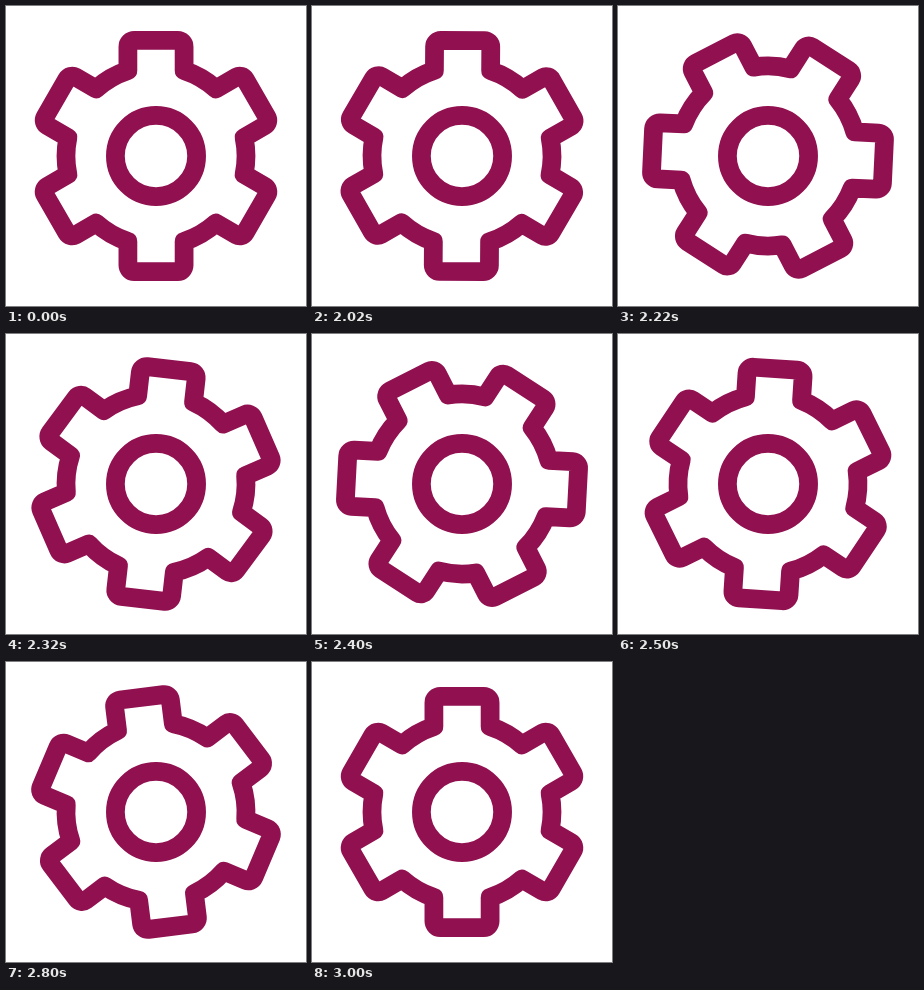
Animation, 300 px wide and 300 px high, one loop 3.02 s. Source, as an HTML page with a canvas:

```html
<!DOCTYPE html>
<html lang="en">
<head>
<meta charset="utf-8">
<title>Settings gear</title>
<style>
  html, body { margin: 0; width: 100%; height: 100%; overflow: hidden; background: #fff; }
  canvas { display: block; width: 300px; height: 300px; }
</style>
</head>
<body>
<canvas id="stage" width="300" height="300"></canvas>
<script>
const ctx = document.getElementById('stage').getContext('2d');
const LOOP = 3020, START = 2000, SPIN = 1000, FRAMES = 40;
const COLOR = '#911050', LINE = 18.75;
const TEETH = 6, ROOT = 90, TIP = 115.6, HALF = 28.1, CORNER = 6.25, HUB = 40.6;

function gearPath() {
  const path = new Path2D();
  const step = 2 * Math.PI / TEETH;
  const spread = Math.asin(HALF / ROOT);
  for (let k = 0; k < TEETH; k++) {
    const a = k * step, c = Math.cos(a), s = Math.sin(a);
    const at = (x, y) => [x * c - y * s, x * s + y * c];
    const mid = a - Math.PI / 2;
    // body arc up to the tooth, then around its rounded tip
    path.arc(0, 0, ROOT, mid - step + spread, mid - spread);
    path.arcTo(...at(-HALF, -TIP), ...at(0, -TIP), CORNER);
    path.arcTo(...at(HALF, -TIP), ...at(HALF, -ROOT), CORNER);
    path.lineTo(ROOT * Math.cos(mid + spread), ROOT * Math.sin(mid + spread));
  }
  path.closePath();
  return path;
}

// cubic-bezier(x1, 0, x2, 1)
function ease(x, x1, x2) {
  let lo = 0, hi = 1;
  for (let i = 0; i < 30; i++) {
    const t = (lo + hi) / 2, u = 1 - t;
    const bx = 3 * x1 * t * u * u + 3 * x2 * t * t * u + t * t * t;
    if (bx < x) lo = t; else hi = t;
  }
  return lo * lo * (3 - 2 * lo);
}

function angleAt(time) {
  const t = time - START;
  if (t < 0 || t >= SPIN) return 0;
  // 40 poses a second, shown for 20 and 30 ms in turn
  const pose = 2 * Math.floor(t / 50) + (t % 50 >= 20 ? 1 : 0);
  return Math.PI * ease(pose / FRAMES, 0.333, 0.377);
}

const gear = gearPath();

function draw(time) {
  ctx.setTransform(1, 0, 0, 1, 0, 0);
  ctx.fillStyle = '#fff';
  ctx.fillRect(0, 0, 300, 300);
  ctx.translate(150, 150);
  ctx.strokeStyle = COLOR;
  ctx.lineWidth = LINE;
  ctx.lineJoin = 'round';
  ctx.beginPath();
  ctx.arc(0, 0, HUB, 0, 2 * Math.PI);
  ctx.stroke();
  ctx.rotate(angleAt(time));
  ctx.stroke(gear);
}

const begin = performance.now();
function tick() {
  draw((performance.now() - begin) % LOOP);
  requestAnimationFrame(tick);
}
tick();
</script>
</body>
</html>
```
